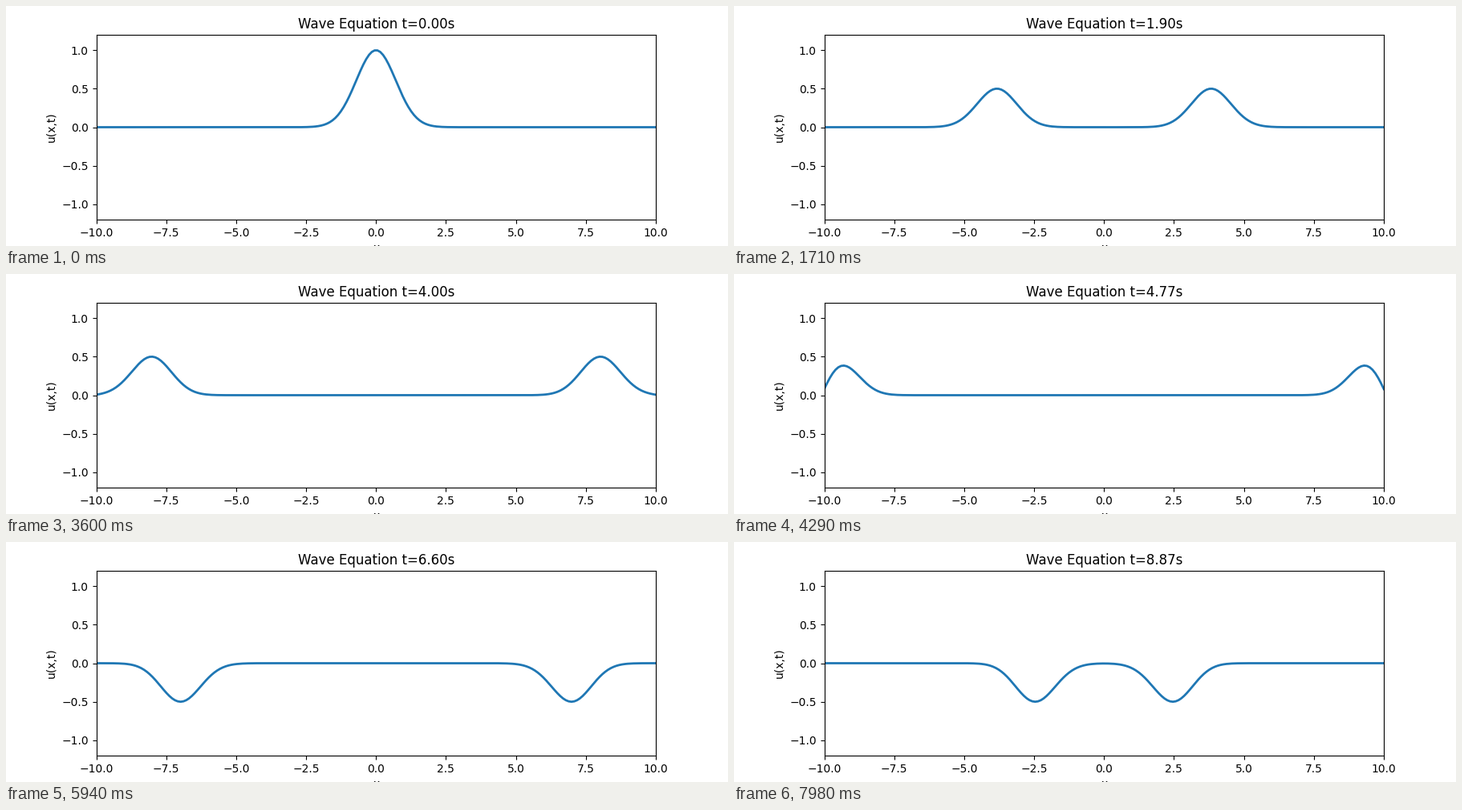
Write a matplotlib script that moves like this. It is 900 px wide and 300 px high and loops after 8 s.

```python
import numpy as np
import matplotlib.pyplot as plt
from matplotlib.animation import FuncAnimation

FRAMES = 267
LOOP_MS = 8000
C = 2.0
DT = 1 / 30

x = np.linspace(-10, 10, 200)
courant2 = (C * DT / (x[1] - x[0])) ** 2


def solve(steps):
    """Leapfrog wave solution, held at zero one cell beyond each end."""
    u = np.exp(-x**2)
    prev = u.copy()
    history = [u]
    for _ in range(steps - 1):
        lap = np.diff(np.pad(u, 1), 2)
        u, prev = 2 * u - prev + courant2 * lap, u
        history.append(u)
    return history


waves = solve(FRAMES)

fig, ax = plt.subplots(figsize=(9, 3), dpi=100)
line, = ax.plot(x, waves[0], lw=2)
ax.set_xlim(-10, 10)
ax.set_ylim(-1.2, 1.2)
ax.set_xlabel("x")
ax.set_ylabel("u(x,t)")
title = ax.set_title("Wave Equation t=0.00s")


def update(n):
    line.set_ydata(waves[n])
    title.set_text(f"Wave Equation t={n * DT:.2f}s")
    return line, title


anim = FuncAnimation(fig, update, frames=FRAMES, interval=LOOP_MS / FRAMES,
                     repeat=True, repeat_delay=0, blit=False)
plt.show()
```
